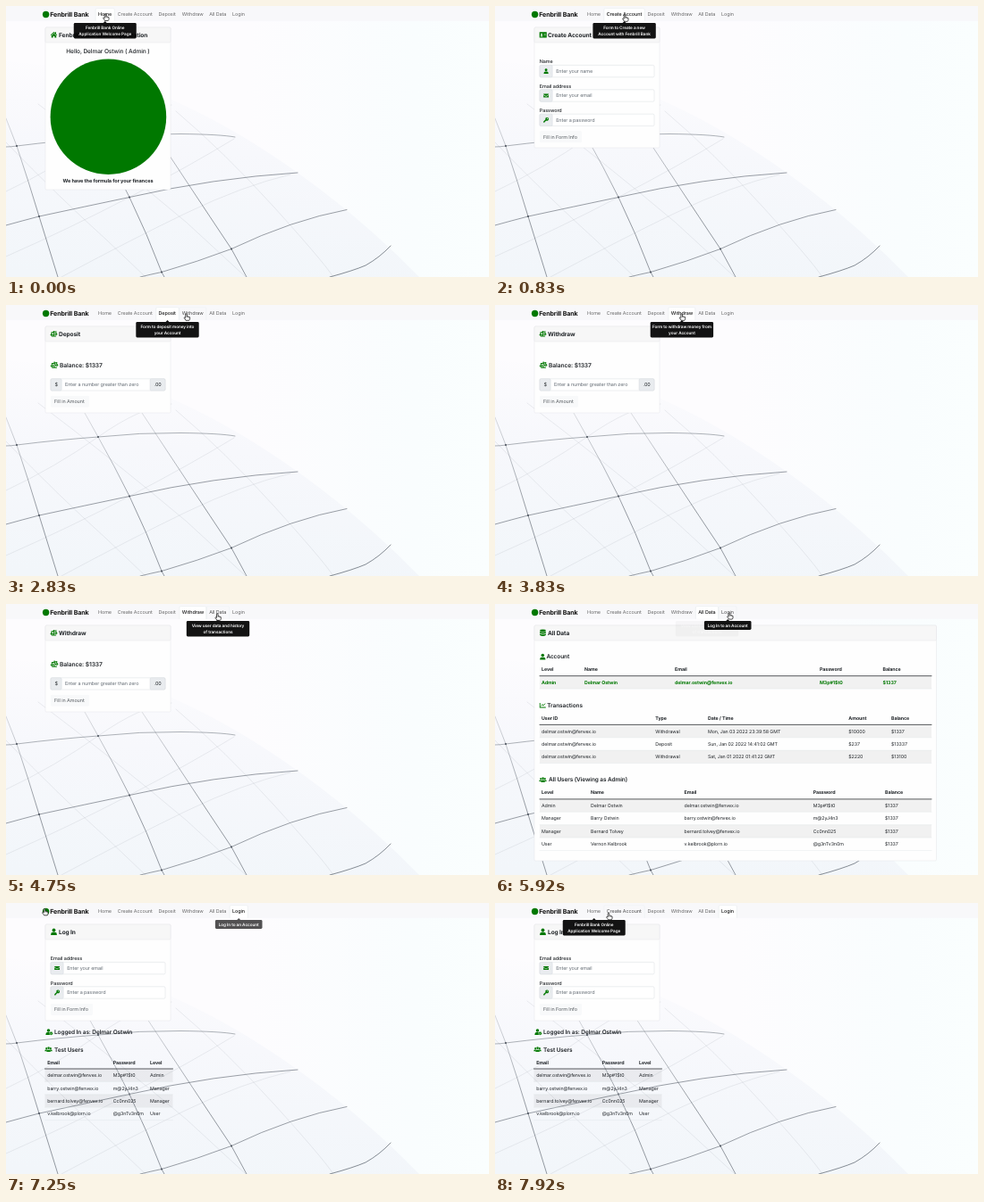
Recreate the animation shown at these times as an HTML page. Size 540x304 px, loop 8 s.

```html
<!DOCTYPE html>
<html lang="en">
<head>
<meta charset="utf-8">
<title>Online bank demo</title>
<style>
  html, body { margin: 0; width: 100%; height: 100%; overflow: hidden; background: #fdfcfe; }
  svg { display: block; width: 100vw; height: 100vh; }
  text { font-family: Inter, "Open Sans", sans-serif; letter-spacing: -.015em; text-rendering: geometricPrecision; white-space: pre; }
</style>
</head>
<body>
<svg id="stage" viewBox="0 0 540 304"></svg>
<script>
const LOOP = 8000, FADE = 150;
const GREEN = '#007800', INK = '#212529', MUTED = '#646c74';
const BANK = 'Fenbrill Bank', USER = 'Delmar Ostwin';
const stage = document.getElementById('stage');

// ---- drawing helpers -------------------------------------------------
const esc = s => s.replace(/&/g, '&amp;').replace(/</g, '&lt;');

// y is the middle of the line of text
function text(x, y, s, { size = 5.45, weight = 400, fill = INK, anchor = 'start' } = {}) {
  return `<text x="${x}" y="${(y + size * .36).toFixed(2)}" font-size="${size}" font-weight="${weight}" fill="${fill}" text-anchor="${anchor}">${esc(s)}</text>`;
}
function rect(x, y, w, h, fill, stroke = 'none', r = 0) {
  return `<rect x="${x}" y="${y}" width="${w}" height="${h}" rx="${r}" fill="${fill}" stroke="${stroke}" stroke-width=".4"/>`;
}
function path(d, stroke, width, opacity = 1) {
  return `<path d="${d}" fill="none" stroke="${stroke}" stroke-width="${width}" stroke-opacity="${opacity}" stroke-linecap="round"/>`;
}

const person = '<circle cx="8" cy="4.4" r="4"/><path d="M1 16v-2q0-4.6 4.6-4.6h4.8q4.6 0 4.6 4.6v2z"/>';
const smallPerson = (x, y) => `<g transform="translate(${x} ${y}) scale(.6)">${person}</g>`;
const ICONS = {
  home: '<path d="M0 8.4 8 1.2l2.8 2.5V2h2.4v3.9L16 8.4l-1.2 1.3L8 3.7 1.2 9.7z"/><path d="M8 5l5.8 5v5H9.8v-4H6.2v4h-4v-5z"/>',
  card: '<path fill-rule="evenodd" d="M0 2h17v13H0zM10 6v1.3h5V6zM10 9v1.3h5V9zM5 5a2 2 0 1 0 .1 0zM2 12.5h6q0-3-3-3t-3 3z"/>',
  scale: '<path d="M7 1h2v2l5-1 .5 2L9 5.2V13h4.500v2.200h-11V13H7V5.500L2 6.600l-.5-2L7 3.400z"/><path fill-rule="evenodd" d="M3 5l3.600 6q-3.600 3.600-7.200 0zM3 7.600 1.800 10.300h2.400zM13 3.500l3.600 6q-3.600 3.600-7.200 0zM13 6.100l-1.200 2.700h2.400z"/>',
  base: '<ellipse cx="8" cy="3" rx="7" ry="2.8"/><path d="M1 4.8q7 4 14 0v4q-7 4-14 0zM1 10.3q7 4 14 0V14q-7 4-14 0z"/>',
  user: person,
  users: smallPerson(-2, 3) + smallPerson(8.5, 3) + '<g stroke="#fff" stroke-width=".6" transform="translate(2.2 1) scale(.75 .85)">' + person + '</g>',
  check: person + '<circle cx="15" cy="12" r="4.4" stroke="#fff"/><path d="M13 12l1.5 1.5 2.6-3" stroke="#fff" stroke-width="1.2" fill="none"/>',
  chart: `<path d="M0 2h2v10.5h14v2H0z"/><path d="M4 9.5 7 6l3 2.5 4.5-5" fill="none" stroke="${GREEN}" stroke-width="2"/>`,
  mail: '<path d="M0 2.5h16v2L8 9.5l-8-5zM0 6.3l8 5 8-5v7.2H0z"/>',
  key: '<path fill-rule="evenodd" d="M11 0a5 5 0 1 1-1.6 9.7L8 11H6.5v1.7H5V14H3.5v2H0v-3.5l6.3-6.2A5 5 0 0 1 11 0zm1 2.4a1.5 1.5 0 1 0 .1 0z"/>'
};
function icon(name, x, y, size = 7.6) {
  return `<g fill="${GREEN}" transform="translate(${x} ${y - size / 2}) scale(${size / 16})">${ICONS[name]}</g>`;
}

// ---- page parts ------------------------------------------------------
function card(bottom, iconName, title, right = 184) {
  const w = right - 44;
  return rect(44, 24, w, bottom - 24, '#fefefe', '#dfdfe2', 1.4) +
    rect(44, 24, w, 17, '#f7f7f7', '#dfdfe2', 1.4) +
    icon(iconName, 49.7, 32.2) + text(59, 32.3, title, { size: 6.6, weight: 700 });
}
function heading(x, y, iconName, s, gap = 10) {
  return icon(iconName, x, y, 7) + text(x + gap, y, s, { size: 6.5, weight: 600 });
}
function field(y, label, iconName, hint) {
  return text(49.8, y, label, { weight: 500 }) +
    rect(50, y + 4.2, 128, 13.4, '#fff', '#ced4da', 1.4) +
    rect(50, y + 4.2, 14.2, 13.4, '#e9ecef', '#ced4da', 1.4) +
    icon(iconName, 54.2, y + 10.9, 5.8) +
    text(68.2, y + 10.9, hint, { fill: MUTED });
}
function button(y, s, w) {
  return rect(50, y - 6.5, w, 13, '#f8f9fa', 'none', 1.4) + text(54, y, s, { fill: '#54595e' });
}
function table(x, right, y, cols, head, rows, style = {}) {
  const pitch = 14.4, top = y + 7.4;
  let out = head.map((h, i) => text(cols[i], y, h, { size: 5.3, weight: 700 })).join('');
  rows.forEach((row, r) => {
    const ry = top + r * pitch;
    if (r % 2 === 0) out += rect(x, ry, right - x, pitch, 'rgba(0,0,0,.05)');
    out += path(`M${x} ${ry + pitch}H${right}`, '#dee2e6', .4);
    out += row.map((c, i) => text(cols[i], ry + pitch / 2, c, { size: 5.3, ...style })).join('');
  });
  return out + path(`M${x} ${top}H${right}`, INK, .75);
}
function money(title) {
  return card(121, 'scale', title) +
    icon('scale', 50, 67.1, 8.2) + text(60, 67.2, 'Balance: $1337', { size: 6.7, weight: 600 }) +
    rect(50, 82.8, 128, 13.2, '#fff', '#ced4da', 1.4) +
    rect(50, 82.8, 12.2, 13.2, '#e9ecef', '#ced4da', 1.4) +
    rect(161, 82.8, 17, 13.2, '#e9ecef', '#ced4da', 1.4) +
    text(54.4, 89.4, '$') + text(165.6, 89.4, '.00') +
    text(66, 89.4, 'Enter a number greater than zero', { fill: MUTED }) +
    button(108.2, 'Fill in Amount', 43);
}

// ---- data ------------------------------------------------------------
const MAIL = 'delmar.ostwin@fenvex.io';
const people = [
  ['Admin', USER, MAIL, 'M3p#1$t0', '$1337'],
  ['Manager', 'Barry Ostwin', 'barry.ostwin@fenvex.io', 'm@2yJ4n3', '$1337'],
  ['Manager', 'Bernard Tolvey', 'bernard.tolvey@fenvex.io', 'Cc0nn025', '$1337'],
  ['User', 'Vernon Kelbrook', 'v.kelbrook@plorn.io', '@g3nTv3n0m', '$1337']
];
const moves = [
  [MAIL, 'Withdrawal', 'Mon, Jan 03 2022 23:39:58 GMT', '$10000', '$1337'],
  [MAIL, 'Deposit', 'Sun, Jan 02 2022 14:41:02 GMT', '$237', '$13337'],
  [MAIL, 'Withdrawal', 'Sat, Jan 01 2022 01:41:22 GMT', '$2220', '$13100']
];
const userHead = ['Level', 'Name', 'Email', 'Password', 'Balance'];

const pages = [
  card(206, 'home', BANK + ' Online Application') +
    text(114, 50.4, `Hello, ${USER} ( Admin )`, { size: 6.6, weight: 500, anchor: 'middle' }) +
    `<circle cx="114.4" cy="124.2" r="64.8" fill="${GREEN}"/>` +
    text(114, 195.9, 'We have the formula for your finances', { size: 5.6, weight: 700, anchor: 'middle' }),

  card(159, 'card', 'Create Account') +
    field(62.2, 'Name', 'user', 'Enter your name') +
    field(89.6, 'Email address', 'mail', 'Enter your email') +
    field(117, 'Password', 'key', 'Enter a password') +
    button(146.8, 'Fill in Form Info', 47),

  money('Deposit'),
  money('Withdraw'),

  card(288, 'base', 'All Data', 493.5) +
    heading(49.8, 59.1, 'user', 'Account', 7.6) +
    table(50, 488, 73.3, [52, 100, 201, 363, 433.5], userHead, people.slice(0, 1), { fill: GREEN, weight: 700 }) +
    heading(49.8, 113.6, 'chart', 'Transactions', 8.5) +
    table(50, 488, 128, [52, 179.3, 238, 395.3, 443], ['User ID', 'Type', 'Date / Time', 'Amount', 'Balance'], moves) +
    heading(50, 197.1, 'users', 'All Users (Viewing as Admin)') +
    table(50, 488, 211.5, [52, 107, 211.6, 355.7, 436], userHead, people),

  card(132, 'user', 'Log In') +
    field(62.2, 'Email address', 'mail', 'Enter your email') +
    field(89.6, 'Password', 'key', 'Enter a password') +
    button(119.4, 'Fill in Form Info', 47) +
    heading(44, 144.5, 'check', 'Logged In as: ' + USER) +
    heading(44, 164.2, 'users', 'Test Users') +
    table(43.5, 186.5, 178.6, [46.2, 119.8, 161], ['Email', 'Password', 'Level'],
      people.map(p => [p[2], p[3], p[0]]))
];

// label, text x, tab left, tab right, tip lines, tip half width
const tabs = [
  ['Home', 103, 100.2, 121.3, [BANK + ' Online', 'Application Welcome Page'], 35],
  ['Create Account', 124.8, 121.9, 167.3, ['Form to Create a new', 'Account with ' + BANK], 35.2],
  ['Deposit', 170.5, 167.8, 193.2, ['Form to deposit money into', 'your Account'], 35.2],
  ['Withdraw', 196.8, 194, 223.8, ['Form to withdraw money from', 'your Account'], 35.2],
  ['All Data', 227.2, 224.4, 249.6, ['View user data and history', 'of transactions'], 35.2],
  ['Login', 253, 250.2, 270.2, ['Log In to an Account'], 26.3]
];

function tip([, , left, right, lines, half]) {
  const c = (left + right) / 2, h = 2.4 + 7.5 * lines.length;
  return `<g class="tip"><path d="M${c} 16.9l2.2 2.3h-4.4z"/>` + rect(c - half, 19.1, half * 2, h, '#000', 'none', 1.4) +
    lines.map((s, i) => text(c, 24.1 + 7.5 * i, s, { size: 4.7, weight: 600, fill: '#fff', anchor: 'middle' })).join('') + '</g>';
}

// ---- backdrop: pale globe with a wire mesh ---------------------------
// each bold line with its opacity
const bold = [
  ['M0 158Q6 158 12 157Q60 151 103 148Q150 143 195 143.5T256 147', .6],
  ['M0 246Q18 241 37 236Q88 225 138 214.5Q232 193 326 187', .75],
  ['M150 304Q162 301 174 298.5Q214 287 252 272.5Q320 240 381 228.5', .75],
  ['M362 304Q388 297 402 291Q418 282 430 269', .9]
];
const steep = [
  'M0 126L12 157Q25 196 37 236L58 304',
  'M84 114Q93 130 103 148Q121 180 138 214.5Q158 256 174 298.5L177 304',
  'M150 118Q175 156 202 197T252 272.5L269 304'
];
const thin = [
  'M0 281Q70 250 138 214.5T255 149', 'M62 304Q140 262 202 232T318 189',
  'M0 208Q55 182 103 148T185 111', 'M0 153Q60 215 112 262L156 304',
  'M36 110Q118 172 202 243L268 304', 'M190 118Q245 165 300 226T366 304'
];
const nodes = [[12, 157], [37, 236], [103, 148], [138, 214.5], [174, 298.5], [252, 272.5]];
const backdrop =
  `<defs><linearGradient id="sky" x1="0" x2="1"><stop offset=".5" stop-color="#fdfcfe"/><stop offset=".85" stop-color="#f9fdfe"/><stop offset="1" stop-color="#fafefe"/></linearGradient>
  <linearGradient id="globe" x1=".4" y1="0" x2=".3" y2="1"><stop offset="0" stop-color="#fdfcfe"/><stop offset=".4" stop-color="#f7f8fc"/><stop offset="1" stop-color="#f2f6fa"/></linearGradient>
  <linearGradient id="rise" gradientUnits="userSpaceOnUse" x1="0" y1="105" x2="0" y2="230"><stop offset="0" stop-color="#5b626c" stop-opacity=".2"/><stop offset="1" stop-color="#5b626c"/></linearGradient></defs>` +
  rect(0, 0, 540, 304, 'url(#sky)') +
  '<path d="M0 62Q110 70 185 105Q255 136 326 187Q400 240 462 304H0z" fill="url(#globe)"/>' +
  thin.map(d => path(d, '#a9aeb8', .5, .45)).join('') +
  steep.map(d => path(d, 'url(#rise)', .75, .85)).join('') +
  bold.map(([d, opacity]) => path(d, '#59616b', .8, opacity)).join('') +
  nodes.map(([x, y]) => `<circle cx="${x}" cy="${y}" r="1" fill="#4a515b"/>`).join('');

const hand = '<g id="hand"><path transform="scale(.88)" d="M-.9 .8Q-.9-.2 0-.2T.9 .8V3Q1.8 2.5 2.2 3.4 3.1 3 3.5 3.8 4.6 3.5 4.6 4.7V6Q4.6 7.3 3.7 8.3H-.5Q-1.3 6.7-2.5 5.4-2.9 4.5-2 4.3-1.4 4.3-.9 5z" fill="#fff" stroke="#111" stroke-width=".85"/><path transform="scale(.88)" d="M.9 3v1.5M2.2 3.4v1.3M3.5 3.8v1" stroke="#111" stroke-width=".5"/></g>';

stage.innerHTML = backdrop +
  pages.map(p => `<g class="page">${p}</g>`).join('') +
  rect(0, 0, 540, 16.8, '#f8f8fa') +
  `<circle cx="44.6" cy="9.5" r="3.7" fill="${GREEN}"/>` +
  text(49.2, 9.4, BANK, { size: 7.1, weight: 700, fill: '#111' }) +
  tabs.map(([s, x, l, r]) => `<g class="tab"><path d="M${l} 16.8V4q0-1.4 1.4-1.4H${r - 1.4}q1.4 0 1.4 1.4V16.8" stroke-width=".4"/>` +
    text(x, 9.4, s, { fill: '#000' }) + '</g>').join('') +
  tabs.map(tip).join('') + hand;

// ---- motion ----------------------------------------------------------
const pageEls = [...stage.querySelectorAll('.page')];
const tabEls = [...stage.querySelectorAll('.tab')];
const tipEls = [...stage.querySelectorAll('.tip')];
const handEl = document.getElementById('hand');

const clicks = [0, 740, 2020, 3400, 5200, 6600];
// tab, shown from, hidden from
const tips = [
  [0, -500, 430], [1, 440, 1590], [2, 1600, 2840], [3, 2850, 4590],
  [4, 4590, 5775], [5, 5765, 7211], [0, 7460, 9000]
];
// time, x, y of the fingertip
const route = [
  [0, 111, 9.2], [250, 111, 9.2], [560, 145, 10], [1330, 145, 10], [1580, 183, 9.2], [2600, 182, 9.2],
  [2830, 201.5, 10], [3000, 208, 10], [4380, 209, 10], [4650, 236.3, 11], [5580, 236.3, 11], [5860, 262, 9.8],
  [7130, 261, 9.8], [7250, 43, 6.5], [7500, 110, 10], [7760, 112, 10], [7920, 127, 11.5], [8000, 140, 11.5]
];

function cursorAt(t) {
  const i = Math.max(1, route.findIndex(k => k[0] > t));
  const [t0, x0, y0] = route[i - 1], [t1, x1, y1] = route[i];
  const u = (t - t0) / (t1 - t0), e = u * u * (3 - 2 * u);
  return [x0 + (x1 - x0) * e, y0 + (y1 - y0) * e];
}
const clamp = v => Math.min(1, Math.max(0, v));

function draw(t) {
  const page = clicks.filter(c => c <= t).length - 1;
  const [x, y] = cursorAt(t);
  pageEls.forEach((el, i) => el.style.display = i === page ? '' : 'none');
  tabEls.forEach((el, i) => {
    const on = i === page, over = x >= tabs[i][2] && x <= tabs[i][3];
    const [box, label] = el.children;
    box.setAttribute('fill', on ? '#fff' : 'none');
    box.setAttribute('stroke', on ? '#dee2e6' : over ? '#e9ecef' : 'none');
    label.setAttribute('fill-opacity', on ? .9 : over ? .7 : .58);
    label.setAttribute('font-weight', on ? 500 : 400);
  });
  const alpha = tabs.map(() => 0);
  for (const [i, from, to] of tips) {
    alpha[i] = Math.max(alpha[i], Math.min(clamp((t - from) / FADE), clamp(1 - (t - to) / FADE)));
  }
  tipEls.forEach((el, i) => el.setAttribute('opacity', (alpha[i] * .92).toFixed(3)));
  handEl.setAttribute('transform', `translate(${x.toFixed(2)} ${y.toFixed(2)})`);
}

function tick() {
  draw(performance.now() % LOOP);
  requestAnimationFrame(tick);
}
tick();
</script>
</body>
</html>
```
